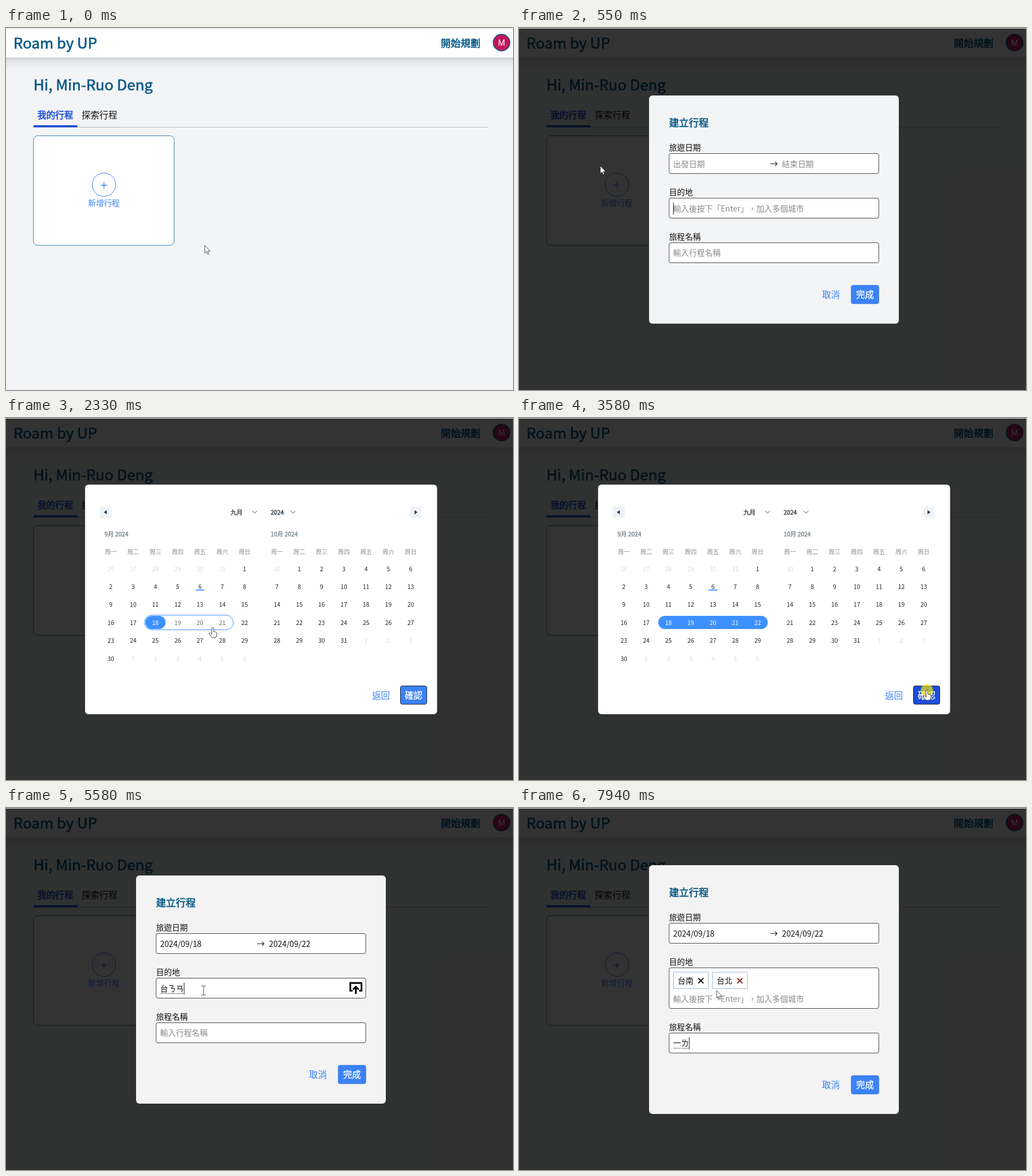
An HTML page for the animation above (8000 ms loop, 885 by 633 pixels).

```html
<!DOCTYPE html>
<html lang="zh-Hant">
<head>
<meta charset="utf-8">
<title>行程規劃</title>
<style>
  html, body { margin: 0; width: 100%; height: 100%; overflow: hidden; background: #f3f4f6; }
  svg { display: block; width: 100vw; height: 100vh; }
  text {
    font-family: "Noto Sans CJK TC", "Noto Sans CJK JP", "Noto Sans CJK SC", "Noto Sans CJK", "Noto Sans", sans-serif;
    white-space: pre;
    text-spacing-trim: space-all;
    font-feature-settings: "chws" 0, "halt" 0;
  }
</style>
</head>
<body>
<svg viewBox="0 0 885 633">
  <defs>
    <linearGradient id="shade" x2="0" y2="1">
      <stop offset="0" stop-color="#000" stop-opacity=".14"/>
      <stop offset=".4" stop-color="#000" stop-opacity=".05"/>
      <stop offset="1" stop-color="#000" stop-opacity="0"/>
    </linearGradient>
  </defs>
  <g id="page"></g>
  <g id="layer"></g>
</svg>
<script>
const LOOP = 8000;
const XS = 10.4, SM = 13.83, MD = 15.55, LG = 17.3, XL = 25.9;
const NAVY = '#075985', BLUE = '#3b82f6', DEEP = '#1d4ed8', PICK = '#3d91ff', HINT = '#8a8a8a', INK = '#111';

// Moments at which the interface changes.
const OPEN = 540, CALENDAR = 1200, START = 1880, END = 2850, CONFIRM = 3670, TAG1 = 5980, TAG2 = 7090, NAME = 7290;
const BLINK = 530, REFOCUS = 4280;

// Pointer stops: time, x, y.
const path = [
  [0, 347, 380], [40, 347, 380], [420, 142, 241], [640, 142, 241], [1080, 295, 240], [CALENDAR, 295, 240],
  [1620, 236, 362], [1730, 244, 363], [2080, 244, 363], [2700, 418, 368], [2940, 418, 368],
  [3480, 712, 476], [CONFIRM, 712, 476], [4010, 385, 285], [4150, 341, 320], [4400, 341, 320], [4480, 345, 319]
];
const clicks = [[440, OPEN], [1100, CALENDAR], [START, 1930], [2750, END], [3530, CONFIRM], [4250, 4380]];
const carets = [[OPEN, OPEN + BLINK], [CONFIRM, CONFIRM + BLINK], [REFOCUS, 4830], [5030, LOOP]];

// Typed text over time; a trailing "." marks committed text.
const destTyping = [
  [5030, 'ㄊ'], [5130, 'ㄊㄞ'], [5280, '台'], [5480, '台ㄋ'], [5580, '台ㄋㄢ'], [5680, '台南'], [5830, '台南.'],
  [TAG1, ''], [6080, 'ㄊ'], [6240, 'ㄊㄞ'], [6310, '台'], [6390, '台ㄅ'], [6540, '台ㄅㄟ'], [6640, '台北'], [6840, '台北.'], [TAG2, '']
];
const nameTyping = [[7690, 'ㄧ'], [7790, '一'], [7940, '一ㄌ']];

const within = (t, spans) => spans.some(([a, b]) => t >= a && t < b);
const latest = (t, list) => list.reduce((found, [at, value]) => t >= at ? value : found, '');
const inside = (p, x, y, w, h) => p.x >= x && p.x <= x + w && p.y >= y && p.y <= y + h;

// Text is placed by its vertical middle; heavy adds weight in em.
function text(x, mid, str, size, fill, heavy = 0, anchor = 'start') {
  const weight = heavy ? ` stroke="${fill}" stroke-width="${(heavy * size).toFixed(2)}"` : '';
  return `<text x="${x}" y="${(mid + 0.355 * size).toFixed(2)}" font-size="${size}" fill="${fill}" text-anchor="${anchor}"${weight}>${str}</text>`;
}
const rect = (x, y, w, h, r, fill, stroke = 'none') =>
  `<rect x="${x}" y="${y}" width="${w}" height="${h}" rx="${r}" fill="${fill}" stroke="${stroke}"/>`;
const line = (d, stroke, width = 1) => `<path d="${d}" fill="none" stroke="${stroke}" stroke-width="${width}"/>`;

// A hand's reach: quick start, long settling tail.
const reach = u => 1 - (1 - u) ** 4 * (1 + 4 * u);

function pointer(t) {
  const i = path.findIndex(k => k[0] > t);
  if (i < 0) {
    const [, x, y] = path[path.length - 1];
    return { x, y };
  }
  const [t0, x0, y0] = path[i - 1], [t1, x1, y1] = path[i];
  const e = reach((t - t0) / (t1 - t0));
  return { x: x0 + (x1 - x0) * e, y: y0 + (y1 - y0) * e };
}

function drawPage() {
  return rect(0, 0, 885, 633, 0, '#f3f4f6') + rect(0, 51, 885, 22, 0, 'url(#shade)') + rect(0, 0, 885, 51.5, 0, '#fff') +
    text(13, 27, 'Roam by UP', XL, NAVY, 0.025) + text(759, 26.5, '開始規劃', LG, NAVY, 0.035) +
    `<circle cx="865" cy="25.5" r="14.5" fill="#c2185b" stroke="${NAVY}" stroke-width="1.6"/>` +
    `<text x="865" y="30.5" font-size="14" fill="#fff" text-anchor="middle" style="font-family:Roboto,sans-serif">M</text>` +
    text(48, 100, 'Hi, Min-Ruo Deng', XL, NAVY, 0.025) +
    text(55, 152, '我的行程', MD, DEEP, 0.04) + text(132, 152, '探索行程', MD, INK) +
    line('M48 173.5H842', '#b3bac0') + rect(48, 170, 76.5, 3.6, 0, DEEP) +
    rect(48, 188.5, 245.5, 191.5, 7, '#fff', '#3c82ad') +
    `<circle cx="171" cy="274" r="20.5" fill="none" stroke="${BLUE}"/>` +
    line('M165.5 275H176.5M171 269.5V280.5', BLUE, 1.3) + text(171, 306, '新增行程', SM, BLUE, 0, 'middle');
}

function button(x, y, w, label, fill, stroke) {
  return rect(x, y, w, 32, 3, fill, stroke) + text(x + w / 2, y + 16.5, label, MD, '#fff', 0.02, 'middle');
}

function typed(mid, value, hint, focused) {
  const str = value.replace('.', ''), x = 269;
  let out = str ? text(x, mid, str, SM, INK) : text(x, mid, hint, SM, HINT);
  if (!value.endsWith('.'))
    [...str].forEach((_, i) => out += line(`M${x + i * SM} ${mid + 8.5}h13`, '#777'));
  if (focused) out += line(`M${x + 0.5 + str.length * SM} ${mid - 10.5}v21`, '#111');
  return out;
}

function tag(x, label, color) {
  return rect(x, 287, 61, 28.5, 0, '#fff', '#a3b8c8') + text(x + 7.5, 302, label, SM, INK) +
    line(`M${x + 43.5} 297.5l9 9m0 -9l-9 9`, color, 1.9);
}

function enterIcon(mid) {
  return line(`M605 ${mid + 4.5}H601V${mid - 9}H620.5V${mid + 4.5}H616.5`, '#000', 3) +
    line(`M610.7 ${mid + 10}V${mid - 1}M605.8 ${mid + 2.5}l4.9 -4.9 4.9 4.9`, '#000', 3);
}

function drawForm(t, p) {
  const up = t >= TAG1 ? 18 : 0, row = up ? 334 : 316, done = t >= CONFIRM;
  const field = (y, h = 35) => rect(262, y, 366, h, 3, '#fff', '#4a4a4a');
  const date = (x, value, hint) => text(x, 238 - up, done ? value : hint, SM, done ? INK : HINT);
  const caret = within(t, carets), dest = latest(t, destTyping);
  const hot = inside(p, 580, 450 + up, 48, 32);
  return rect(227, 118 - up, 436, 399 + 2 * up, 6, done ? '#f3f3f3' : '#f3f4f6') +
    text(262, 166 - up, '建立行程', LG, NAVY, 0.035) +
    text(262, 209 - up, '旅遊日期', SM, INK) + field(219.5 - up) +
    date(269, '2024/09/18', '出發日期') + date(459, '2024/09/22', '結束日期') +
    line(`M438.5 ${237.5 - up}H450.5M447 ${234 - up}l3.5 3.5 -3.5 3.5`, '#222', 1.1) +
    text(262, 287 - up, '目的地', SM, INK) + field(297.5 - up, 35 + 2 * up) +
    (up ? tag(269.5, '台南', '#111') : '') + (t >= TAG2 ? tag(337.5, '台北', '#991b1b') : '') +
    typed(row, dest, '輸入後按下「Enter」，加入多個城市', caret && t < NAME) +
    (dest ? enterIcon(row - 1) : '') +
    text(262, 365 + up, '旅程名稱', SM, INK) + field(375.5 + up) +
    typed(393.5 + up, latest(t, nameTyping), '輸入行程名稱', caret && t >= NAME) +
    text(529, 466.5 + up, '取消', MD, BLUE) +
    button(580, 450 + up, 48, '完成', hot ? DEEP : BLUE, '#2f6fe0');
}

// Month grids: the first cell's offset from the 1st, month length, row count.
const STEP = 38.9, ROW = 31.4, TOP = 264;
const months = [
  { x: 183, lead: 6, days: 30, before: 31, rows: 6, label: '9月 2024' },
  { x: 473, lead: 1, days: 31, before: 30, rows: 5, label: '10月 2024' }
];

function hoveredCell(p) {
  for (const m of months) {
    const col = Math.floor((p.x - m.x) / STEP + 0.5), row = Math.floor((p.y - TOP) / ROW + 0.5);
    if (col >= 0 && col < 7 && row >= 0 && row < m.rows) return { m, cell: row * 7 + col };
  }
  return null;
}

function pill(m, from, to, halfH, inset, fill, stroke) {
  let out = '';
  for (let r = Math.floor(from / 7); r <= Math.floor(to / 7); r++) {
    const a = Math.max(from, r * 7) % 7, b = Math.min(to, r * 7 + 6) % 7;
    out += rect(m.x + (a - 0.5) * STEP + inset, TOP + r * ROW - 0.7 - halfH, (b - a + 1) * STEP - 2 * inset, 2 * halfH, halfH, fill, stroke);
  }
  return out;
}

function drawCalendar(t, p) {
  const sept = months[0], first = sept.lead - 1;
  const picked = t < START ? [first + 6, first + 6] : [first + 18, first + (t < END ? 18 : 22)];
  const picking = t >= START && t < END, hover = hoveredCell(p);
  const chevron = x => line(`M${x - 4} 162.5l4 4 4 -4`, '#8a949a', 1.2);
  let out = rect(138, 116.5, 614.5, 401.5, 6, '#fff') +
    rect(163.5, 154, 21, 21, 4, '#eff2f7') + rect(705, 154, 21, 21, 4, '#eff2f7') +
    '<path d="M170.5 164.7l5.5 -3.7v7.4zM718.5 164.7l-5.5 -3.7v7.4z" fill="#34495e"/>' +
    text(392, 165, '九月', XS, '#3e484f', 0.05) + chevron(434) +
    text(462, 165, '2024', XS, '#3e484f', 0.05) + chevron(501) +
    pill(sept, ...picked, 11.5, 1.7, PICK, 'none');
  let preview = null;
  if (hover) {
    const from = picking && hover.m === sept ? Math.min(picked[0], hover.cell) : hover.cell;
    preview = [from, hover.cell];
    out += pill(hover.m, ...preview, 12.8, 0.2, 'none', PICK);
  }
  for (const m of months) {
    out += text(m === sept ? 172 : 462, 203.5, m.label, XS, '#7d888e', 0.04);
    [...'一二三四五六日'].forEach((d, i) => out += text(m.x + i * STEP, 234.5, '周' + d, XS, '#849095', 0, 'middle'));
    for (let i = 0; i < m.rows * 7; i++) {
      const n = i - m.lead + 1, passive = n < 1 || n > m.days;
      const label = n < 1 ? m.before + n : n > m.days ? n - m.days : n;
      const chosen = m === sept && i >= picked[0] && i <= picked[1];
      const previewed = picking && preview && hover.m === m && i >= preview[0] && i <= preview[1];
      const color = chosen ? '#fff' : passive ? '#d5dce0' : previewed ? '#666e73' : '#1d2429';
      const x = m.x + (i % 7) * STEP, y = TOP + Math.floor(i / 7) * ROW;
      out += text(x.toFixed(2), y, label, XS, color, 0, 'middle');
      if (m === sept && n === 6) out += rect(x - 7.8, y + 4.7, 15.6, 1.7, 0.8, chosen ? '#fff' : PICK);
    }
  }
  const hot = inside(p, 688, 468, 47, 32);
  return out + text(639, 485, '返回', MD, BLUE) + button(688.5, 468.5, 46, '確認', hot ? DEEP : BLUE, '#1e293b');
}

const shapes = {
  arrow: 'M0 0V13.5L3 10.8 5 15.5 7 14.6 5.1 10.2H9.4Z',
  hand: 'M-1.6 1.6a1.6 1.6 0 0 1 3.2 0V7l4 .8q2 .6 1.8 2.8l-1 5q-.3 2 -2 2H0q-1.4 0 -2.2 -1.2l-3.6 -5q-.8 -1.4 .5 -1.9q1 -.3 2 .8l1.7 1.6z',
  beam: 'M-4 -8h3l1 1 1 -1h3M0 -7V7M-4 8h3l1 -1 1 1h3'
};

function pointerKind(t, p, view) {
  if (view === 'home') return inside(p, 48, 188, 246, 192) ? 'hand' : 'arrow';
  if (view === 'calendar') return hoveredCell(p) || inside(p, 688, 468, 47, 32) ? 'hand' : 'arrow';
  const up = t >= TAG1 ? 18 : 0;
  if ([219.5 - up, 297.5 + up * 1.5, 375.5 + up].some(y => inside(p, 262, y, 366, 35 - up / 2))) return 'beam';
  return inside(p, 580, 450 + up, 48, 32) ? 'hand' : 'arrow';
}

function drawPointer(t, p, view) {
  const kind = pointerKind(t, p, view), at = `translate(${p.x.toFixed(1)} ${p.y.toFixed(1)})`;
  const halo = within(t, clicks) ? '<circle r="10.7" fill="#ffee00" fill-opacity=".65"/>' : '';
  const fill = kind === 'beam' ? 'none' : '#fff';
  return `<g transform="${at}">${halo}<path d="${shapes[kind]}" fill="${fill}" stroke="#222" stroke-width=".8" stroke-linejoin="round"/></g>`;
}

const page = document.getElementById('page'), layer = document.getElementById('layer');
page.innerHTML = drawPage();
let shown = '';

function render(t) {
  const p = pointer(t);
  const view = t < OPEN ? 'home' : t >= CALENDAR && t < CONFIRM ? 'calendar' : 'form';
  let out = view === 'home' ? '' : rect(0, 0, 885, 633, 0, 'rgba(0,0,0,.8)');
  out += line('M0 .5H885', '#d9d9d9');
  if (view === 'form') out += drawForm(t, p);
  if (view === 'calendar') out += drawCalendar(t, p);
  out += drawPointer(t, p, view);
  if (out !== shown) layer.innerHTML = shown = out;
}

const began = performance.now();
function tick() {
  render((performance.now() - began) % LOOP);
  requestAnimationFrame(tick);
}
tick();
</script>
</body>
</html>
```
